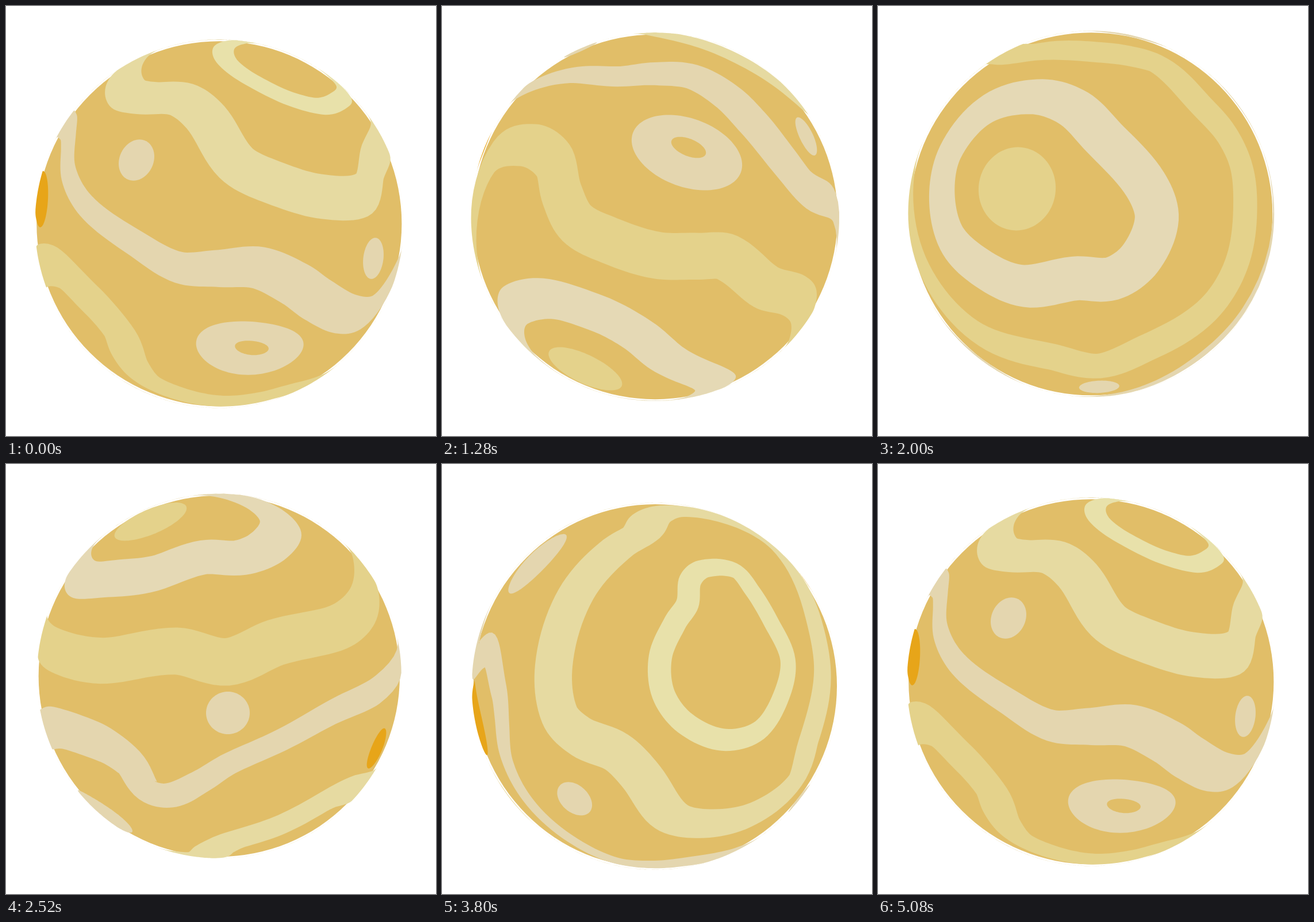
These frames come from a looping animation (748 by 748 pixels, 5.12 s). An HTML page with a canvas:

```html
<!DOCTYPE html>
<html lang="en">
<head>
<meta charset="utf-8">
<title>Turning planet</title>
<style>
html, body { margin: 0; width: 100%; height: 100%; overflow: hidden; background: #fff; }
canvas { display: block; width: 748px; height: 748px; }
</style>
</head>
<body>
<canvas id="stage" width="748" height="748"></canvas>
<script>
const ctx = document.getElementById('stage').getContext('2d');
const LOOP = 5120, STEP = 40, LAST = 127;
const CX = 370.8, CY = 374;
const RADIUS = 312.6, SHELL = RADIUS * 1.009, DIST = 2188;
const OFFSET = 12.5, OFFSET_ANGLE = 22 * Math.PI / 180;
const PALE = '#e5d9b5', BEIGE = '#e4d6af', YELLOW = '#e4d28b', CREAM = '#e6daa1', LIGHT = '#e8e1aa';
const ORANGE = '#e7a519', GROUND = '#e1be68';

// Vectors
const dot = (a, b) => a[0] * b[0] + a[1] * b[1] + a[2] * b[2];
const cross = (a, b) => [a[1] * b[2] - a[2] * b[1], a[2] * b[0] - a[0] * b[2], a[0] * b[1] - a[1] * b[0]];
const add = (a, b, s = 1) => a.map((v, i) => v + b[i] * s);
const unit = a => { const n = Math.hypot(...a) || 1; return a.map(v => v / n); };
function turn([x, y, z], angle) {
  const c = Math.cos(angle), s = Math.sin(angle);
  return [x, y * c - z * s, z * c + y * s];
}

// Pose of the globe; its centre sits slightly off the turning axis
function pose(ms) {
  const u = Math.floor(ms / STEP) / LAST;
  const angle = u * u * (3 - 2 * u) * 2 * Math.PI;
  return {
    angle,
    oy: OFFSET * Math.sin(OFFSET_ANGLE - angle),
    oz: OFFSET * Math.cos(OFFSET_ANGLE - angle)
  };
}

// Stage point at a given time -> point on the unit globe
function pick(ms, x, y) {
  const { angle, oy, oz } = pose(ms);
  const dir = [(x - CX) / DIST, (y - CY) / DIST, -1];
  const eye = [0, -oy, DIST - oz];
  const a = dot(dir, dir), b = dot(eye, dir), c = dot(eye, eye) - SHELL * SHELL;
  const s = (-b - Math.sqrt(Math.max(0, b * b - a * c))) / a;
  return turn(unit(add(eye, dir, s)), -angle);
}

// Closed smooth curve through points of the globe
function smooth(pts, steps = 10) {
  const n = pts.length, out = [];
  const at = i => pts[(i + n) % n];
  const gap = i => Math.hypot(...add(at(i + 1), at(i), -1)) || 1e-6;
  const slope = i => add(at(i + 1), at(i - 1), -1).map(v => v / (gap(i - 1) + gap(i)));
  for (let i = 0; i < n; i++) {
    const p = at(i), q = at(i + 1), d = gap(i), m = slope(i), k = slope(i + 1);
    for (let j = 0; j < steps; j++) {
      const t = j / steps, t2 = t * t, t3 = t2 * t;
      out.push(unit(p.map((v, c) =>
        (2 * t3 - 3 * t2 + 1) * v + (t3 - 2 * t2 + t) * d * m[c] +
        (3 * t2 - 2 * t3) * q[c] + (t3 - t2) * d * k[c])));
    }
  }
  return out;
}

// A shape keeps a flat chart of its loops for inside tests
function shape(color, ...loops) {
  const axis = unit(loops[0].reduce((a, p) => add(a, p), [0, 0, 0]));
  const e1 = unit(cross(axis, [0.3, 0.5, 0.8])), e2 = cross(axis, e1);
  const chart = p => {
    const x = dot(p, e1), y = dot(p, e2), h = Math.hypot(x, y) || 1e-9;
    const r = Math.atan2(h, dot(p, axis));
    return [x / h * r, y / h * r];
  };
  return { color, loops, chart, flat: loops.map(l => l.map(chart)) };
}

// Closed stripe along key points, given as pairs of time and stage coordinates;
// width in radians, swelling twice per round
function band(color, width, swell, ...keys) {
  const pts = [];
  for (let i = 0; i < keys.length; i += 2) {
    const xy = keys[i + 1];
    for (let j = 0; j < xy.length; j += 2) pts.push(pick(keys[i], xy[j], xy[j + 1]));
  }
  const line = smooth(pts), n = line.length;
  const edge = side => line.map((p, i) => {
    const along = add(line[(i + 1) % n], line[(i + n - 1) % n], -1);
    const half = (width + swell * Math.cos(4 * Math.PI * i / n)) / 2;
    return unit(add(p, unit(cross(p, along)), side * half));
  });
  return shape(color, edge(1), edge(-1));
}

function oval(ms, x, y, rx, ry, tilt = 0) {
  const c = Math.cos(tilt * Math.PI / 180), s = Math.sin(tilt * Math.PI / 180), pts = [];
  for (let i = 0; i < 24; i++) {
    const a = i * Math.PI / 12, px = rx * Math.cos(a), py = ry * Math.sin(a);
    pts.push(pick(ms, x + px * c - py * s, y + px * s + py * c));
  }
  return smooth(pts, 4);
}

function contains(s, p) {
  const [x, y] = s.chart(p);
  let inside = false;
  for (const poly of s.flat) {
    poly.forEach(([ax, ay], i) => {
      const [bx, by] = poly[(i + 1) % poly.length];
      if ((ay > y) !== (by > y) && x < ax + (y - ay) / (by - ay) * (bx - ax)) inside = !inside;
    });
  }
  return inside;
}

const shapes = [
  shape(YELLOW, oval(2000, 242, 318, 67, 72.5, 8)),
  band(PALE, 0.226, 0,
    2000, [275,156, 340,176, 393,228, 466,310, 486,370, 457,440, 408,475, 342,475, 250,488, 172,452,
      125,403, 109,325, 124,253, 188,178]),
  band(YELLOW, 0.228, 0,
    2520, [80,322, 165,342, 295,325, 385,344, 470,310, 580,283, 622,246],
    2000, [641,345, 634,278],
    1280, [610,503, 565,490, 497,438, 445,436, 372,434, 290,408, 233,378, 207,327, 192,268, 148,241, 88,262],
    2000, [55,330]),
  band(BEIGE, 0.175, 0.055,
    2520, [90,460, 160,484, 213,520, 246,569, 285,577, 338,553, 390,521, 470,485, 570,431, 648,392],
    1280, [684,350],
    0, [632,532, 592,537, 543,512, 503,484, 440,456, 370,457, 300,455, 225,413, 138,347, 108,290, 108,235],
    3800, [98,395, 82,325],
    3160, [58,425, 60,370]),
  band(CREAM, 0.22, 0,
    3800, [232,225, 193,350, 203,437, 240,475, 303,502, 347,546],
    0, [400,272, 465,306, 550,331, 625,326, 640,270],
    3800, [664,365, 650,275],
    3160, [605,325, 565,300, 480,307, 400,330, 364,372, 345,430, 303,466]),
  band(LIGHT, 0.11, 0,
    3800, [455,182, 510,185, 540,220, 573,275, 602,340, 592,400, 553,463, 490,480, 423,451, 385,400,
      380,335, 406,275, 427,243, 432,202]),
  shape(BEIGE, oval(1280, 426, 255, 100, 59.5, 20), oval(1280, 429, 246, 32, 15, 22)),
  shape(BEIGE, oval(2520, 386, 433, 38, 37)),
  shape(BEIGE, oval(0, 639, 439, 17.5, 36, 7)),
  shape(BEIGE, oval(0, 227, 268, 29.5, 37, 25)),
  shape(BEIGE, oval(3160, 157, 393, 46, 64, 25)),
  shape(ORANGE, oval(3160, 649, 306, 14.5, 35, -10)),
  shape(ORANGE, oval(0, 62, 336, 11, 49, 3))
];

function drawShape(s, { angle, oy, oz }) {
  const rim = SHELL / (DIST - oz), rimSize = Math.sqrt(1 - rim * rim);
  const project = ([x, y, z]) => {
    const k = DIST / (DIST - oz - SHELL * z);
    return [CX + k * SHELL * x, CY + k * (oy + SHELL * y)];
  };
  const onRim = a => project([rimSize * Math.cos(a), rimSize * Math.sin(a), rim]);

  ctx.beginPath();
  for (const pts of s.loops) {
    let last = null, first = true;
    const go = p => { first ? ctx.moveTo(...p) : ctx.lineTo(...p); first = false; };
    // Hidden points slide along the rim
    for (let i = 0; i <= pts.length; i++) {
      const p = turn(pts[i % pts.length], angle);
      if (p[2] > rim) {
        go(project(p));
        last = null;
        continue;
      }
      const a = Math.atan2(p[1], p[0]);
      if (last !== null) {
        const d = Math.atan2(Math.sin(a - last), Math.cos(a - last));
        const n = Math.ceil(Math.abs(d) / 0.04);
        for (let j = 1; j < n; j++) go(onRim(last + d * j / n));
      }
      go(onRim(a));
      last = a;
    }
    ctx.closePath();
  }
  // A shape covering the far point is the complement of its outline
  if (contains(s, turn([0, 0, -1], -angle))) {
    for (let i = 0; i < 180; i++) {
      const p = onRim(i * Math.PI / 90);
      i ? ctx.lineTo(...p) : ctx.moveTo(...p);
    }
    ctx.closePath();
  }
  ctx.fillStyle = s.color;
  ctx.fill('evenodd');
}

function draw(now) {
  const view = pose(now % LOOP), depth = DIST - view.oz;
  ctx.fillStyle = '#fff';
  ctx.fillRect(0, 0, 748, 748);
  ctx.fillStyle = GROUND;
  ctx.beginPath();
  ctx.arc(CX, CY + view.oy * DIST / depth, DIST * RADIUS / Math.sqrt(depth * depth - RADIUS * RADIUS), 0, 2 * Math.PI);
  ctx.fill();
  for (const s of shapes) drawShape(s, view);
}

function tick() {
  draw(performance.now());
  requestAnimationFrame(tick);
}
tick();
</script>
</body>
</html>
```
